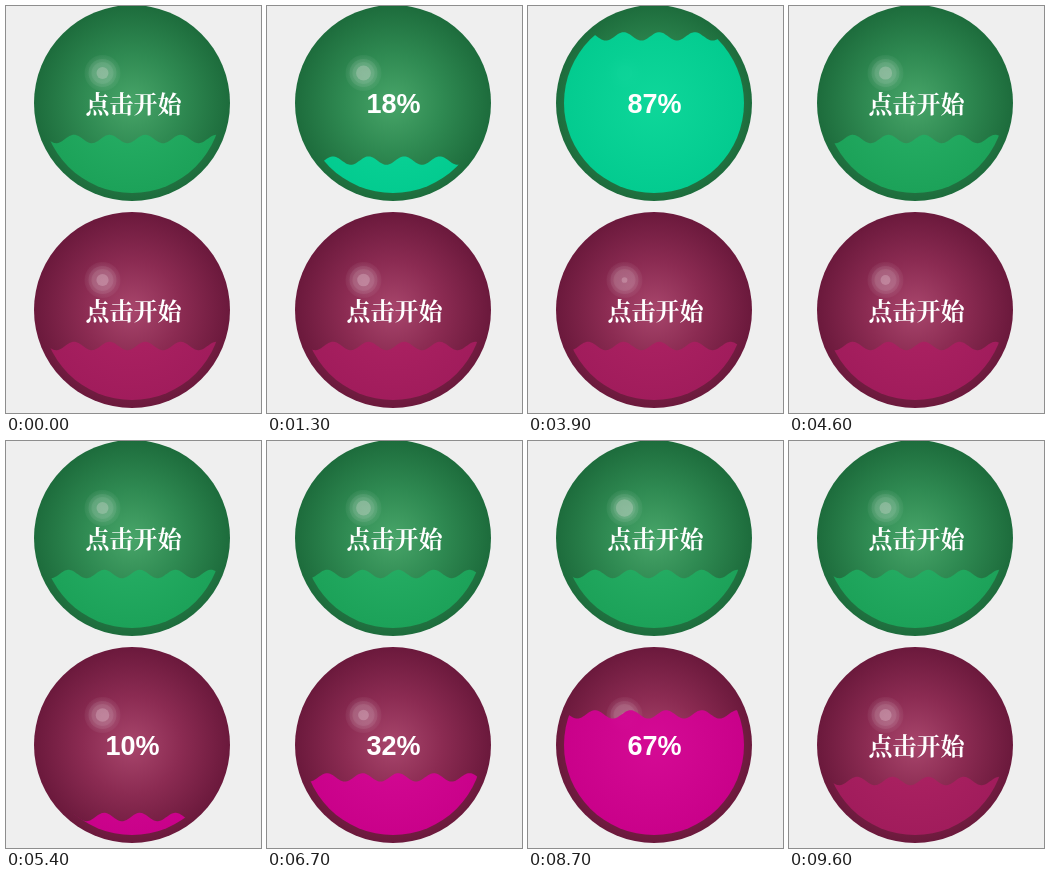
Animation of 255x407 px, one loop 9.7 s. Source, as an HTML page with a canvas:

```html
<!DOCTYPE html>
<html lang="zh-CN">
<meta charset="utf-8">
<title>水波球</title>
<style>
  html, body { margin: 0; width: 100%; height: 100%; overflow: hidden; background: #efefef; }
  canvas { display: block; }
</style>
<canvas id="stage" width="255" height="407"></canvas>
<script>
const ctx = document.getElementById('stage').getContext('2d');
const LOOP = 9700, STEP = 100, REST = 9600;
const CX = 126, RADIUS = 98, INNER = 90, WAVELENGTH = 35.6;

const balls = [
  { cy: 97, shell: ['#48a569', '#2f8a52', '#1d6c3c'], idle: ['#27b167', '#1ca45a'], active: ['#0cd99c', '#02cf93'],
    start: 620, end: 4500, rate: 0.02654, pulse: t => 7.5 - 1.5 * Math.cos(t / 860) },
  { cy: 304, shell: ['#a8466c', '#8b2b52', '#6b193c'], idle: ['#ae2263', '#a31c5d'], active: ['#d60896', '#cd008d'],
    start: 4815, end: REST, rate: 0.0172, pulse: t => 4.5 + 2.5 * Math.sin(t / 800 + 0.7) }
];

function disc(x, y, r, fill) {
  ctx.beginPath();
  ctx.arc(x, y, r, 0, Math.PI * 2);
  ctx.fillStyle = fill;
  ctx.fill();
}

function radial(x, y, r, colors) {
  const g = ctx.createRadialGradient(x, y, 0, x, y, r);
  colors.forEach((c, i) => g.addColorStop(i / (colors.length - 1), c));
  return g;
}

function glint(x, y, core) {
  disc(x, y, 18, radial(x, y, 18, ['rgba(255,255,255,.16)', 'rgba(255,255,255,.14)', 'rgba(255,255,255,.04)']));
  for (const r of [14, 11]) disc(x, y, r, 'rgba(255,255,255,.07)');
  disc(x, y, core, 'rgba(255,235,240,.22)');
}

function water(cy, percent, phase, colors) {
  const level = cy + INNER - percent / 100 * INNER * 2;
  ctx.save();
  ctx.beginPath();
  ctx.arc(CX, cy, INNER, 0, Math.PI * 2);
  ctx.clip();
  ctx.beginPath();
  ctx.moveTo(CX - INNER, cy + INNER);
  for (let x = CX - INNER; x <= CX + INNER; x++)
    ctx.lineTo(x, level - 4.2 * Math.cos((x - phase) * 2 * Math.PI / WAVELENGTH));
  ctx.lineTo(CX + INNER, cy + INNER);
  ctx.globalAlpha = 0.96;
  ctx.fillStyle = radial(CX, cy, INNER, colors);
  ctx.fill();
  ctx.restore();
}

function drawBall(ball, t) {
  const { cy } = ball;
  const running = t >= ball.start && t < ball.end;
  const percent = running ? Math.min(100, Math.round((t - ball.start) * ball.rate)) : 30;
  const crest = 64 + 4 * Math.cos(2 * Math.PI * 3.205 * t / 1000);

  disc(CX, cy, RADIUS, radial(CX, cy, RADIUS, ball.shell));
  glint(96.5, cy - 30, ball.pulse(t));
  water(cy, percent, crest, running ? ball.active : ball.idle);

  ctx.fillStyle = '#fff';
  ctx.textAlign = 'center';
  if (running) {
    ctx.font = 'bold 27px "Liberation Sans", Arial, sans-serif';
    ctx.fillText(percent + '%', 126.5, cy + 10);
  } else {
    ctx.font = '600 24px "Noto Serif CJK SC", "Noto Sans CJK SC", serif';
    ctx.fillText('点击开始', 127.5, cy + 10);
  }
}

function draw() {
  let t = Math.floor(performance.now() % LOOP / STEP) * STEP;
  if (t >= REST) t = 0;
  ctx.fillStyle = '#efefef';
  ctx.fillRect(0, 0, 255, 407);
  balls.forEach(ball => drawBall(ball, t));
  requestAnimationFrame(draw);
}
draw();
</script>
</html>
```
